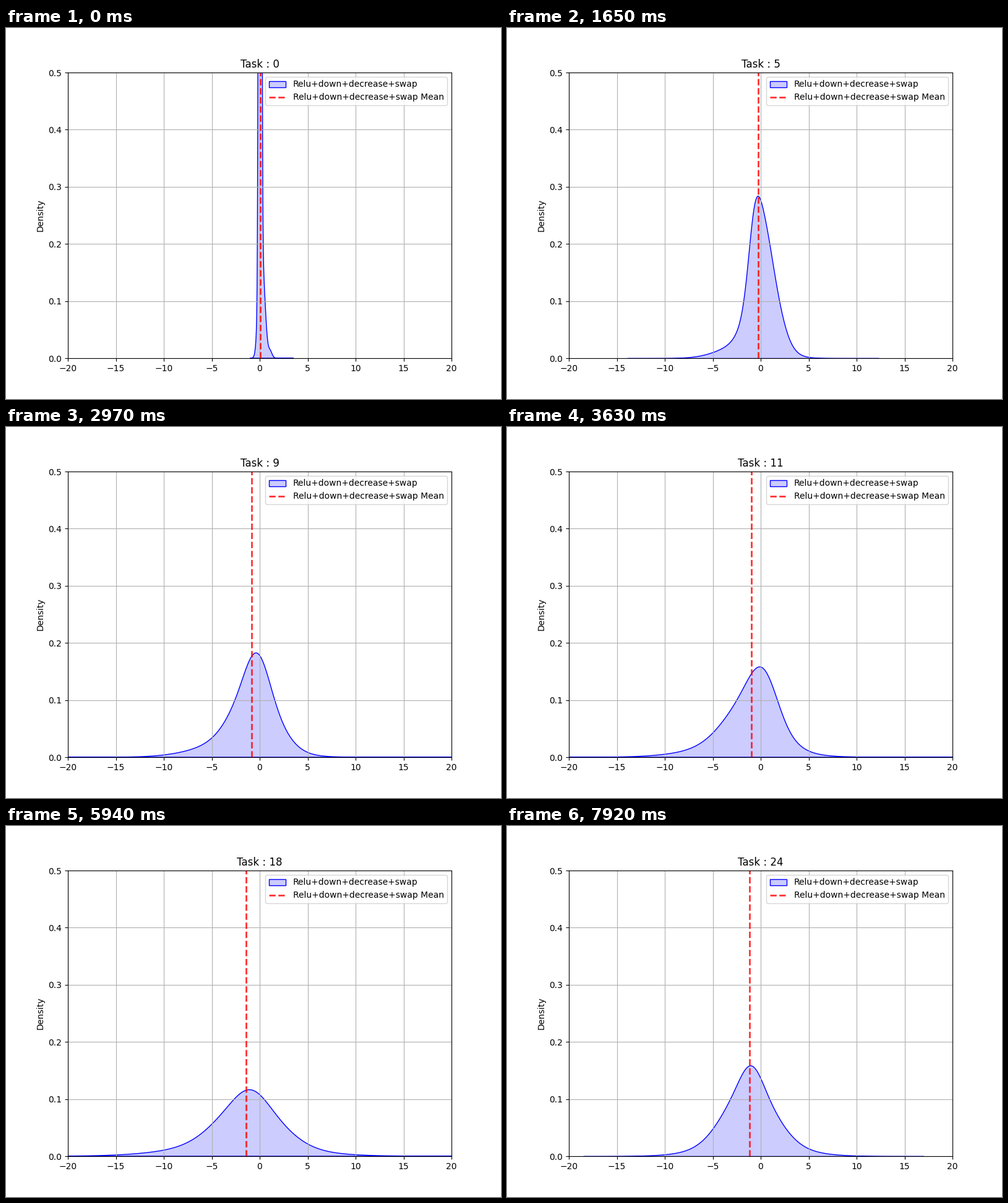
A matplotlib script that plays this animation: 800 px wide and 600 px high, repeating every 8 s.

```python
import numpy as np
import matplotlib.pyplot as plt
from matplotlib.animation import FuncAnimation

LOOP_MS, STEP_MS, TICK_MS = 8000, 330, 40
TASKS = 25
LABEL = "Relu+down+decrease+swap"

# Key tasks: mean, support, and bells (height, centre, width) that add up to
# the density: a sharp core, the main body, a wide tail and a side peak.
KEYS = {
    0: (.08, (-1, 3.5), [(4, .04, .108), (.22, .1, .25), (.014, 1.05, .22), (.06, .53, .2)]),
    3: (.2, (-11, 7), [(.262, -.48, .35), (.235, .6, .95), (.02, 0, 2), (.108, .42, .33)]),
    7: (-.7, (-16.8, 17.6), [(.043, -.8, .95), (.136, .05, 1.8), (.034, -2.6, 3.2)]),
    11: (-.97, (-40, 40), [(.066, .3, 1.45), (.082, -1, 2.6), (.02, -2.5, 4.5)]),
    15: (-1.22, (-40, 40), [(.011, -.8, 1.2), (.1, -.55, 2.6), (.022, -3, 5.5)]),
    20: (-1.53, (-40, 19.6), [(.0213, -1, 1.82), (.0666, -1.5, 3.5), (.0206, -1.9, 6.26)]),
    24: (-1.15, (-18.5, 17), [(.034, -1, 1.1), (.105, -1.2, 2.55), (.02, -1.1, 4.5)]),
}
NO_BELL = (0, .4, 1)


def params(task):
    """Flat vector of mean, support and the mass, centre and width of each bell."""
    mean, span, bells = KEYS[task]
    bells = bells + [NO_BELL] * (4 - len(bells))
    return np.r_[mean, span, np.ravel([(h * w, c, w) for h, c, w in bells])]


def density(task):
    """Mean and curve of a task, its bells blended between the nearest keys."""
    a = max(k for k in KEYS if k <= task)
    b = min((k for k in KEYS if k > task), default=a + 1)
    t = (task - a) / (b - a)
    v = params(a)
    if t:
        v = (1 - t) * v + t * params(b)
    x = np.linspace(v[1], v[2], 800)
    p = sum(m / w * np.exp(-((x - c) / w) ** 2 / 2) for m, c, w in v[3:].reshape(-1, 3))
    return v[0], x, p


curves = [density(k) for k in range(TASKS)]

fig, ax = plt.subplots(figsize=(8, 6), dpi=100)
mean, x, p = curves[0]
area = ax.fill_between(x, p, facecolor=(0, 0, 1, .2), edgecolor=(0, 0, 1, 1),
                       linewidth=1, label=LABEL)
line = ax.axvline(mean, color="red", linestyle="--", linewidth=2, alpha=.8,
                  label=LABEL + " Mean")
ax.set_xlim(-20, 20)
ax.set_ylim(0, .5)
ax.set_ylabel("Density")
ax.grid(True)
ax.legend(loc="upper right")
title = ax.set_title("Task : 0")


def update(i):
    # A tick shows the task that begins within it.
    task = min((i * TICK_MS + 30) // STEP_MS, TASKS - 1)
    mean, x, p = curves[task]
    area.set_verts([np.column_stack([np.r_[x, x[::-1]], np.r_[p, 0 * p]])])
    line.set_xdata([mean, mean])
    title.set_text(f"Task : {task}")
    return area, line, title


anim = FuncAnimation(fig, update, frames=LOOP_MS // TICK_MS, interval=TICK_MS,
                     init_func=lambda: update(0), repeat=True, repeat_delay=0)
plt.show()
```
